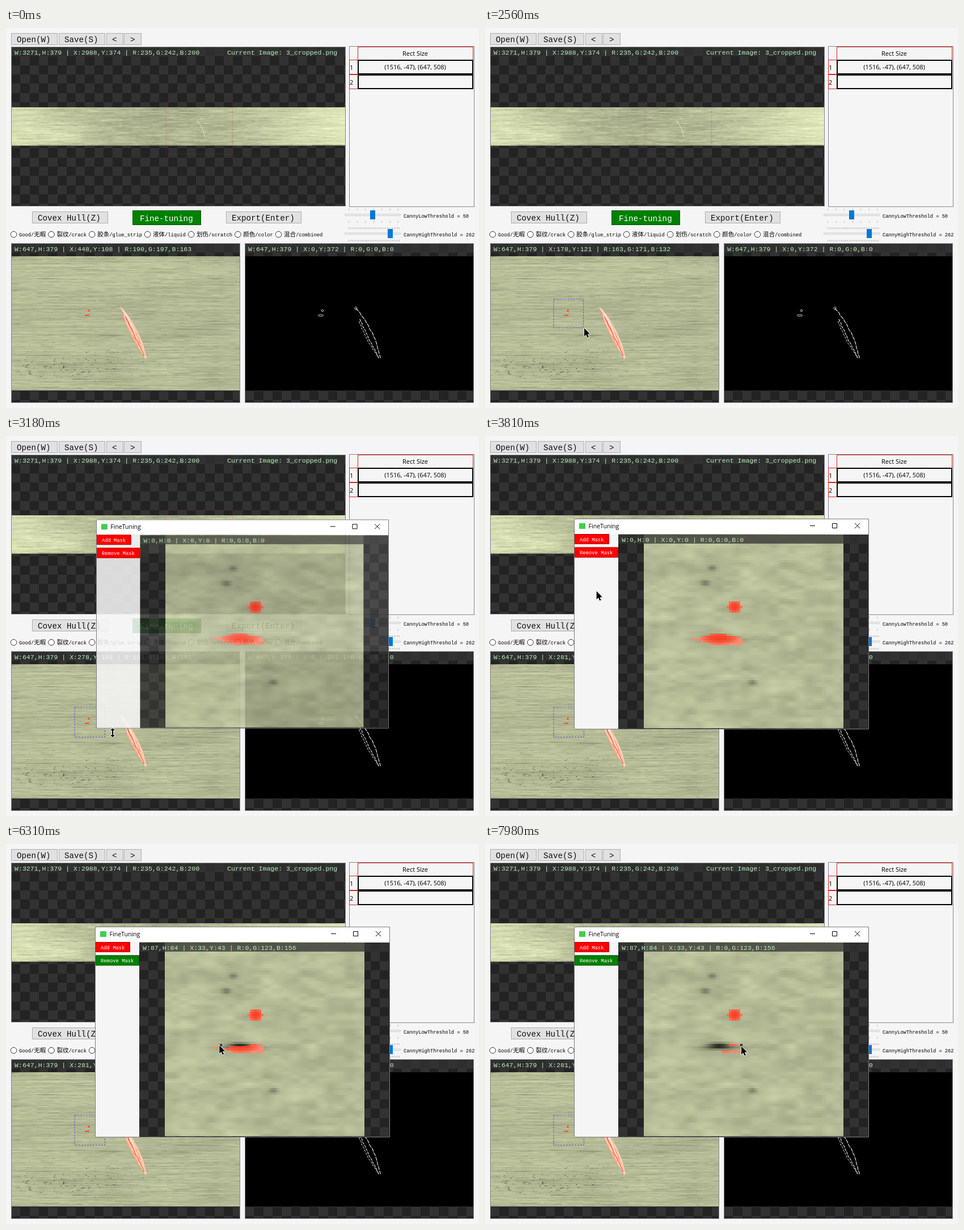
An HTML page with a canvas for the animation above (8 s loop, 834 px wide and 671 px high).

```html
<!DOCTYPE html>
<html lang="en">
<head>
<meta charset="utf-8">
<title>Fine tuning a defect mask</title>
<style>
html, body { margin: 0; width: 100%; height: 100%; overflow: hidden; background: #f5f5f5; }
canvas { display: block; }
</style>
</head>
<body>
<canvas id="stage" width="834" height="671"></canvas>
<script>
const LOOP = 8000;
const MONO = '"Liberation Mono", "Noto Sans Mono", monospace';
const SANS = '"Open Sans", "Noto Sans", sans-serif';
const CJK = '"Noto Sans CJK SC", "Noto Sans CJK", sans-serif';
const BAND = 'rgba(50,50,50,.75)', GREEN = '#b6f0b8';
const stage = document.getElementById('stage').getContext('2d');

// ---- helpers ----
function layer(w, h) {
  const c = document.createElement('canvas');
  c.width = w;
  c.height = h;
  return c.getContext('2d');
}

function text(g, s, x, y, size, color = '#000', family = MONO, align = 'left') {
  g.font = `${size}px ${family}`;
  g.fillStyle = color;
  g.textAlign = align;
  g.fillText(s, x, y);
}

function mixed(g, s, x, y) {
  for (const part of s.match(/[\x00-\x7f]+|[^\x00-\x7f]+/g)) {
    const latin = part.charCodeAt(0) < 128;
    text(g, part, x, y, latin ? 8.75 : 10.5, '#000', latin ? MONO : CJK);
    x += g.measureText(part).width;
  }
  return x;
}

function box(g, x, y, w, h, fill, line, width = 1) {
  if (fill) { g.fillStyle = fill; g.fillRect(x, y, w, h); }
  if (line) {
    g.strokeStyle = line;
    g.lineWidth = width;
    g.strokeRect(x + width / 2, y + width / 2, w - width, h - width);
  }
}

function poly(g, pts, color, width = 1, dash = []) {
  g.beginPath();
  for (const [x, y] of pts) g.lineTo(x, y);
  g.strokeStyle = color;
  g.lineWidth = width;
  g.setLineDash(dash);
  g.stroke();
  g.setLineDash([]);
}

function dashedBox(g, x, y, r, b, color, dash) {
  poly(g, [[x, y], [r, y], [r, b], [x, b], [x, y]], color, 1, dash);
}

function checker(g, x, y, w, h) {
  const size = 16.3, at = i => Math.round(i * size);
  box(g, x, y, w, h, '#232323');
  g.fillStyle = '#323232';
  for (let j = 0; at(j) < h; j++)
    for (let i = j % 2; at(i) < w; i += 2)
      g.fillRect(x + at(i), y + at(j), Math.min(at(i + 1), w) - at(i), Math.min(at(j + 1), h) - at(j));
}

function hash(x, y) {
  let n = Math.imul(x, 374761393) + Math.imul(y, 668265263) | 0;
  n = Math.imul(n ^ (n >>> 13), 1274126177);
  return ((n ^ (n >>> 16)) >>> 0) / 4294967296;
}

const smooth = p => p * p * (3 - 2 * p);
const bump = (x, y, cx, cy, rx, ry) => Math.exp(-(((x - cx) / rx) ** 2) - ((y - cy) / ry) ** 2);

function noise(x, y) {
  const i = Math.floor(x), j = Math.floor(y), u = smooth(x - i), v = smooth(y - j);
  const a = hash(i, j) * (1 - u) + hash(i + 1, j) * u;
  const b = hash(i, j + 1) * (1 - u) + hash(i + 1, j + 1) * u;
  return a * (1 - v) + b * v;
}

// ---- brushed metal, as brightness functions ----
const metal = v => [v, v * 1.035, v * 0.83];
function plate(w, h, bright) {
  const g = layer(w, h), img = g.createImageData(w, h);
  for (let y = 0; y < h; y++)
    for (let x = 0; x < w; x++) img.data.set([...metal(bright(x, y)), 255], (y * w + x) * 4);
  g.putImageData(img, 0, 0);
  return g.canvas;
}

function strip(x, y) {
  const edge = Math.abs((x - 270) / 310) ** 1.6;
  const grain = 44 * (noise(x / 28, y * 0.9) - 0.5) + 26 * (noise(x / 6 + 90, y) - 0.5);
  const rim = y > 66 ? (x > 530 ? 110 : 50) : 0;
  return 172 + 52 * edge + 18 * bump(x, y, 85, 48, 60, 15) + grain * (1 - 0.35 * edge) - rim;
}

function closeUp(x, y) {
  const worn = bump(x, y, 110, 195, 130, 28);
  const grain = 26 * (noise(x / 70, y * 0.8 + 40) - 0.5) + 20 * (noise(x / 10 + 7, y * 0.9) - 0.5);
  const pit = Math.max(0, noise(x / 4 + 300, y / 1.3) - 0.92 + 0.14 * worn);
  const groove = Math.max(0, noise(x / 60 + 50, y * 0.9 + 11) - 0.84);
  return 181 - 6 * worn + 14 * (noise(x / 90, y / 20) - 0.5) + grain - 420 * pit - 220 * groove;
}

const spots = [[29.4, 14], [26.5, 20.5], [47, 63.5]];
function magnified(x, y) {
  let v = 181 + 24 * (noise(x / 9, y / 3.2) - 0.5) + 18 * (noise(x / 4 + 60, y / 1.7) - 0.5);
  for (const [cx, cy] of spots) v -= 55 * bump(x, y, cx, cy, 2, 1.2);
  return v - 110 * bump(x, y, 32, 44.2, 4.5, 1.3) - 52 * bump(x, y, 32, 45, 11, 1.1);
}

// ---- the defect: a leaf along a slightly bent line ----
function leaf(k, side) {
  return [201 + 47 * k ** 0.9 + side * 7.5 * Math.sin(Math.PI * k) ** 0.8, 491 + 96 * k];
}

function leafLine(side, from = 0, to = 1, jitter = 0) {
  const pts = [];
  for (let k = from; k <= to; k += 0.04) {
    const [x, y] = leaf(k, side);
    pts.push([x + jitter * (hash(pts.length, 3) - 0.5), y]);
  }
  return pts;
}

function scratch(g) {
  g.beginPath();
  for (const [x, y] of [...leafLine(1), ...leafLine(-1).reverse()]) g.lineTo(x, y);
  g.fillStyle = '#fac8ac';
  g.fill();
  for (let i = 0; i < 26; i++) {
    const from = 0.8 * hash(i, 5), tone = ['#f68a70', '#fde8d0', '#fbb298', '#fff2e0'][i % 4];
    poly(g, leafLine(1.8 * hash(i, 9) - 0.9, from, from + 0.22), tone, 1);
  }
  poly(g, leafLine(-0.2, 0.2, 0.95, 2), '#f25a40', 1.2);
  poly(g, leafLine(-0.9, 0.1, 0.95), '#f57a60', 0.8);
  box(g, 144, 497.5, 4, 3, '#f4553c');
  box(g, 139, 506, 8, 3, '#f7644c');
}

function edges(g) {
  g.save();
  g.translate(412, 0);
  g.strokeStyle = '#f0f0f0';
  for (const [x, y, rx, ry] of [[146, 499, 2, 1.7], [143, 507.5, 5, 1.5], [205, 495, 2, 2.5]]) {
    g.beginPath();
    g.ellipse(x, y, rx, ry, 0, 0, 7);
    g.stroke();
  }
  poly(g, leafLine(1, 0.04, 1, 1.5), '#f0f0f0', 1.1, [7, 1.5]);
  poly(g, leafLine(-0.4, 0.24, 1, 1.5), '#f0f0f0', 1.1, [5, 1.5]);
  poly(g, leafLine(-0.9, 0.28, 1, 1.5), '#f0f0f0', 1, [4, 2]);
  g.restore();
}

// ---- main window ----
function button(g, s, x, y, w, tx) {
  box(g, x, y, w, 21, '#e1e1e1', '#adadad');
  text(g, s, tx, y + 16.3, 14.2, '#111');
}

function slider(g, y, at, step) {
  box(g, 597, y - 2, 99, 4, '#e7eaea', '#d6d6d6');
  g.fillStyle = '#b4b4b4';
  for (let x = 604; x < 693; x += step)
    for (const dy of [-11, 11]) g.fillRect(Math.round(x), y + dy, 1, 3);
  box(g, at - 4, y - 8, 9, 16, '#0078d7');
}

function radio(g, s, x) {
  g.beginPath();
  g.arc(x, 364.5, 5.3, 0, 7);
  g.fillStyle = '#fff';
  g.fill();
  g.strokeStyle = '#333';
  g.lineWidth = 1;
  g.stroke();
  return mixed(g, s, x + 9.5, 368) + 9.7;
}

function drawTable(g) {
  box(g, 605, 32, 221, 284, '#f5f5f5', '#828790');
  box(g, 620, 33, 204, 24, null, '#e02020');
  text(g, 'Rect Size', 721.5, 48.5, 11, '#000', SANS, 'center');
  ['(1516, -47), (647, 508)', ''].forEach((s, i) => {
    const y = 56 + 26 * i;
    box(g, 605, y, 16, 26, null, '#e02020');
    box(g, 620, y, 204, 26, null, '#000', 2);
    text(g, i + 1, 606, y + 18, 11, '#000', SANS);
    text(g, s, 721.5, y + 17, 11, '#000', SANS, 'center');
  });
}

function drawBase() {
  const g = layer(834, 671);
  box(g, 0, 0, 834, 671, '#f5f5f5');
  button(g, 'Open(W)', 9, 9, 82, 19);
  button(g, 'Save(S)', 93, 9, 82, 103);
  button(g, '<', 177, 9, 30, 187);
  button(g, '>', 208, 9, 31, 219);

  checker(g, 9, 33, 590, 282);
  g.drawImage(plate(590, 68, strip), 9, 139.5);
  g.beginPath();
  g.moveTo(337, 163);
  g.quadraticCurveTo(347, 175, 351, 193);
  g.strokeStyle = '#e3e9c4';
  g.stroke();
  dashedBox(g, 282.5, 131.5, 399.5, 222.5, 'rgba(190,50,45,.4)', [2, 2]);
  box(g, 9, 33, 590, 17, BAND);
  box(g, 9, 33, 590, 282, null, '#828790');
  text(g, 'W:3271,H:379 | X:2988,Y:374 | R:235,G:242,B:200', 15, 46.5, 11.57, GREEN);
  text(g, 'Current Image: 3_cropped.png', 390, 46.5, 11.57, GREEN);
  drawTable(g);

  button(g, 'Covex Hull(Z)', 46, 324, 134, 56);
  box(g, 223, 322, 121, 26, '#008000', '#005a00');
  text(g, 'Fine-tuning', 236, 340.5, 14.2, '#fff');
  button(g, 'Export(Enter)', 388, 324, 133, 398);

  let x = 13.5;
  for (const s of ['Good/无暇', '裂纹/crack', '胶条/glue_strip', '液体/liquid', '划伤/scratch', '颜色/color', '混合/combined'])
    x = radio(g, s, x);
  slider(g, 330, 646, 14.5);
  slider(g, 363, 677, 2.95);
  text(g, 'CannyLowThreshold = 50', 701, 334.5, 8.72);
  text(g, 'CannyHighThreshold = 262', 701, 367.5, 8.72);

  for (const left of [9, 421]) {
    checker(g, left, 380, 404, 282);
    if (left === 9) g.drawImage(plate(404, 237, closeUp), 9, 403);
    else box(g, left, 403, 404, 237, '#000');
    box(g, left, 380, 404, 17, BAND);
    box(g, left, 380, 404, 282, null, '#828790');
  }
  scratch(g);
  edges(g);
  text(g, 'W:647,H:379 | X:0,Y:372 | R:0,G:0,B:0', 427, 394, 11.57, GREEN);
  return g.canvas;
}

// ---- pointer: each leg is start time, end time, goal ----
const legs = [
  [350, 1110, 134.5, 490.5], [1350, 1900, 119.2, 478],                          // aim
  [2080, 2560, 175, 530], [2660, 2700, 175.5, 531.5],                           // drag the rectangle
  [2990, 3060, 181.6, 526.1], [3060, 3180, 188, 524], [3210, 4020, 199, 207],   // to the mask button
  [4170, 4580, 424, 312], [4680, 4700, 428, 325.5], [4800, 5080, 350, 338], [5080, 5480, 414, 351],
  [5510, 5680, 428, 352], [5680, 6300, 376.3, 355.5], [6340, 6460, 367, 359],   // erase row by row
  [6460, 6720, 412, 364.4], [6720, 6760, 418, 361.3], [6760, 6980, 475, 361.3],
  [6980, 7430, 367, 360.5], [7430, 7900, 447, 361], [7900, 7960, 452, 357.2]];

function pointer(t) {
  let x = 390, y = 680;
  for (const [from, to, gx, gy] of legs) {
    if (t <= from) break;
    const p = Math.min(1, (t - from) / (to - from)), k = (p + smooth(p)) / 2;
    x += (gx - x) * k;
    y += (gy - y) * k;
  }
  return [x, y];
}

const ARROW = [[0, 0], [0, 14.5], [3.3, 11.5], [5.5, 16.6], [7.9, 15.6], [5.7, 10.6], [10.2, 10.4]];
const HALF = [[-1, 0], [-1, -4], [-4, -4], [0, -8], [4, -4], [1, -4], [1, 0]];
const RESIZE = [...HALF, ...HALF.map(([x, y]) => [-x, -y])];

function drawShape(g, pts, x, y) {
  g.beginPath();
  for (const [dx, dy] of pts) g.lineTo(x + dx, y + dy);
  g.closePath();
  g.lineJoin = 'round';
  g.strokeStyle = '#fff';
  g.lineWidth = 1.6;
  g.stroke();
  g.fillStyle = '#000';
  g.fill();
}

function drawPointer(g, t) {
  const [x, y] = pointer(t);
  if (t > 3100 && y > 508) return drawShape(g, RESIZE, x, y);
  const pressed = t > 1860 && t < 2990;
  if (pressed || t > 3100 || y > 662) return drawShape(g, ARROW, x, y);
  box(g, Math.round(x) - 7, Math.round(y), 14, 1, '#000');
  box(g, Math.round(x), Math.round(y) - 7, 1, 14, '#000');
}

// ---- status lines ----
function readout(x, y, v) {
  const [r, g, b] = metal(v).map(c => Math.max(0, Math.round(c)));
  return `X:${x},Y:${y} | R:${r},G:${g},B:${b}`;
}

// while the pointer rests: from, to, text
const rests = [
  [0, 400, 'X:448,Y:108 | R:190,G:197,B:163'],
  [1110, 1350, 'X:203,Y:141 | R:184,G:192,B:153'],
  [1860, 2990, 'X:178,Y:121 | R:163,G:171,B:132'],
  [3060, 3200, 'X:278,Y:198 | R:183,G:189,B:151'],
  [3200, 4200, 'X:281,Y:195 | R:181,G:188,B:150'],
  [4690, 4800, 'X:36,Y:36 | R:68,G:58,B:95'],
  [5480, LOOP, 'X:33,Y:43 | R:0,G:123,B:156']];
const resting = t => rests.find(([from, to]) => t >= from && t < to)?.[2];

function closeUpInfo(t) {
  t = Math.min(t, 4000);
  const [x, y] = pointer(t);
  if (resting(t)) return resting(t);
  if (y > 639) return rests[0][2];
  return readout(Math.round((x - 8) / 0.6244), Math.round((y - 402.5) / 0.6244),
    closeUp(Math.round(x - 9), Math.round(y - 403)));
}

function patchInfo(t) {
  if (t < 4200) return 'W:0,H:0 | X:0,Y:0 | R:0,G:0,B:0';
  const [c, r] = cellAt(t);
  return 'W:87,H:84 | ' + (resting(t) || readout(Math.max(0, c), Math.max(0, r), magnified(c, r)));
}

// ---- fine tuning window ----
const patch = plate(87, 84, magnified);
const work = layer(87, 84);
const pane = layer(834, 671);

function cellAt(t) {
  const [x, y] = pointer(t);
  return [Math.round((x - 280) * 87 / 352 - 0.2), Math.round((y - 174.5) * 84 / 342 - 0.7)];
}

const inLens = (c, r) => r >= 43 && r <= 47 && c >= 21 + 4 * Math.abs(r - 45) && c <= Math.min(42, 5 * r - 180);
const inDot = (c, r) => Math.hypot((c - 39) / 3.2, (r - 31) / 2.7) < 1;

function erasedCells(t) {
  const gone = new Set();
  for (let s = 5490; s <= t; s += 8) {
    const [c, r] = cellAt(s);
    for (const dc of [-1, 0])
      for (const dr of [0, 1]) gone.add((c + dc) + ',' + (r + dr));
  }
  return gone;
}

function paintPatch(t) {
  const gone = erasedCells(t);
  work.drawImage(patch, 0, 0);
  for (let r = 28; r < 48; r++)
    for (let c = 20; c < 44; c++) {
      const lens = inLens(c, r);
      if (!lens && !inDot(c, r) || gone.has(c + ',' + r)) continue;
      const d = lens ? Math.hypot((c - 32.5) / 9, (r - 44.6) / 3) : Math.hypot((c - 39) / 3.6, (r - 31) / 3.2);
      const pale = 78 * Math.min(1, d) ** 2;
      box(work, c, r, 1, 1, `rgb(250,${62 + pale},${36 + pale})`);
    }
  if (t > 4200) box(work, ...cellAt(t), 1, 1, '#2e3038');
}

function maskButton(g, s, y, w, on) {
  box(g, 158, y, w, 18, on ? '#008000' : '#ff0000', on ? '#005a00' : '#b40000');
  text(g, s, 167, y + 12.5, 8.85, '#fff');
}

function drawPane(g, t) {
  box(g, 157, 173, 78, 345, '#f5f5f5');
  checker(g, 235, 174, 441, 343);
  g.imageSmoothingEnabled = false;
  g.drawImage(work.canvas, 280, 174, 352, 342);
  box(g, 235, 174, 441, 16, BAND);
  text(g, patchInfo(t), 241, 187, 11.57, GREEN);
}

function drawFrame(g, t) {
  maskButton(g, 'Add Mask', 173, 61, false);
  maskButton(g, 'Remove Mask', 196.5, 77, t > 4100);
  box(g, 157, 146, 520, 27, '#fff');
  box(g, 166, 154, 11, 10, '#41cd52');
  text(g, 'FineTuning', 182.5, 163, 10.6, '#000', SANS);
  box(g, 573, 158, 9, 1, '#000');
  box(g, 612, 154, 9, 9, null, '#000');
  poly(g, [[652, 154], [661, 163]], '#000');
  poly(g, [[661, 154], [652, 163]], '#000');
  box(g, 157, 146, 520, 372, null, '#7c7c7c');
}

function drawWindow(g, t) {
  const p = Math.min(1, (t - 3066) / 200);
  if (p <= 0) return;
  const e = 1 - (1 - p) ** 3, scale = 0.9 + 0.1 * e, alpha = e ** 1.7;
  paintPatch(t);
  drawPane(pane, t);
  g.save();
  g.translate(417, 332);
  g.scale(scale, scale);
  g.translate(-417, -332);
  g.globalAlpha = alpha;
  g.drawImage(pane.canvas, 0, 0);
  g.globalAlpha = Math.min(1, alpha * 1.15);
  drawFrame(g, t);
  g.restore();
}

// ---- one picture per moment ----
const base = drawBase();

function draw(t) {
  const g = stage;
  g.drawImage(base, 0, 0);
  text(g, 'W:647,H:379 | ' + closeUpInfo(t), 15, 394, 11.57, GREEN);
  if (t >= 2080) {
    const [x, y] = pointer(Math.min(t, 2900));
    dashedBox(g, 121, 478.5, Math.round(x) - 1.5, Math.round(y) - 0.5, '#5c54c0', [3, 2]);
  }
  drawWindow(g, t);
  drawPointer(g, t);
}

const start = performance.now();
function tick(now) {
  draw(Math.max(0, now - start) % LOOP);
  requestAnimationFrame(tick);
}
draw(0);
requestAnimationFrame(tick);
</script>
</body>
</html>
```
